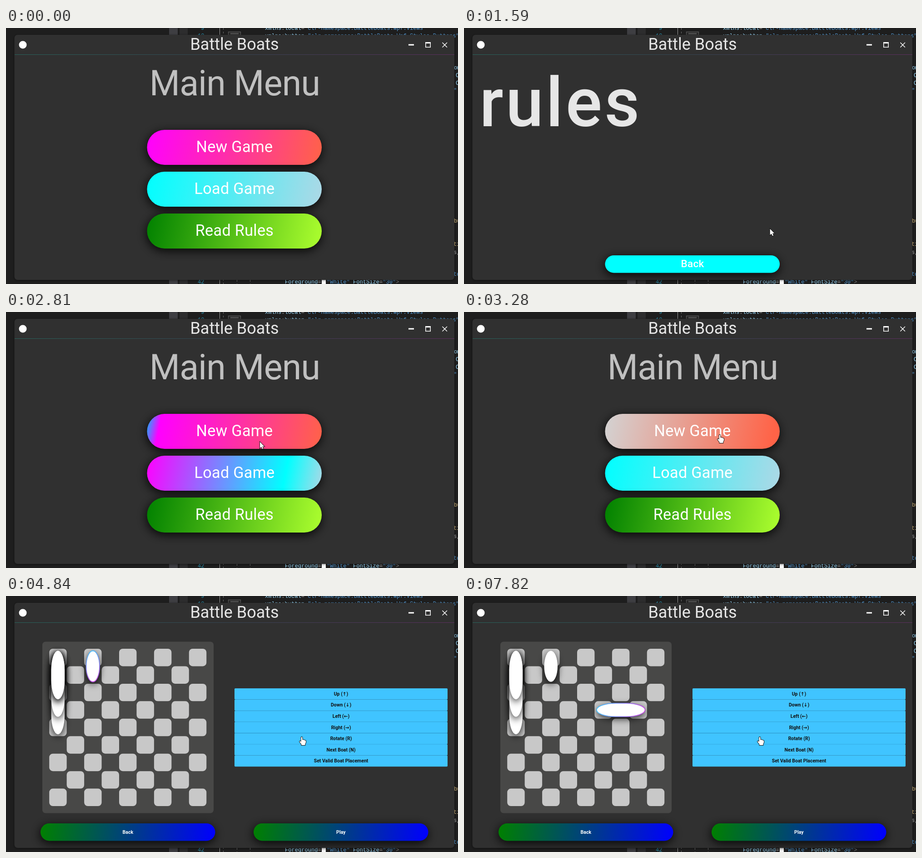
An HTML page with a canvas for the animation above (8000 ms loop, 995 px wide and 563 px high).

```html
<!DOCTYPE html>
<html lang="en">
<head>
<meta charset="utf-8">
<title>Battle Boats</title>
<style>
html, body { margin: 0; width: 100%; height: 100%; overflow: hidden; background: #1e1e1e; }
canvas { display: block; }
</style>
</head>
<body>
<canvas id="stage" width="995" height="563"></canvas>
<script>
const ctx = document.getElementById('stage').getContext('2d');
const LOOP = 8000, CELL = 38.45, BOARD_X = 95.2, BOARD_Y = 116;
const RULES_AT = 1150, MENU_AT = 2500, SETUP_AT = 3380;
const UI = 'Roboto, "DejaVu Sans", sans-serif';
const MONO = '12.08px "Liberation Mono", monospace';

// Linear interpolation through [time, value, value...] keys
function track(t, keys) {
  if (t <= keys[0][0]) return keys[0].slice(1);
  for (let i = 1; i < keys.length; i++) {
    const [a, b] = [keys[i - 1], keys[i]];
    if (t < b[0]) {
      const p = (t - a[0]) / (b[0] - a[0]);
      return a.slice(1).map((v, j) => v + (b[j + 1] - v) * p);
    }
  }
  return keys[keys.length - 1].slice(1);
}
const passed = (t, times) => times.filter(s => t >= s).length;
const within = (t, a, b) => t >= a && t < b;

function rect(x, y, w, h, fill, r = 0) {
  ctx.fillStyle = fill;
  ctx.beginPath();
  ctx.roundRect(x, y, w, h, r);
  ctx.fill();
}

function line(points, color, width) {
  ctx.strokeStyle = color;
  ctx.lineWidth = width;
  ctx.beginPath();
  points.forEach(([x, y]) => ctx.lineTo(x, y));
  ctx.stroke();
}

function text(str, x, y, font, color, align = 'center', spacing = 0) {
  ctx.font = font;
  ctx.fillStyle = color;
  ctx.textAlign = align;
  ctx.letterSpacing = spacing + 'px';
  ctx.fillText(str, x, y);
}

function shadowed(color, dx, dy, blur, draw) {
  ctx.save();
  Object.assign(ctx, { shadowColor: color, shadowOffsetX: dx, shadowOffsetY: dy, shadowBlur: blur });
  draw();
  ctx.restore();
}

// Gradient running corner to corner; stops are [offset, color]
function diagonal(x, y, w, h, stops) {
  const g = ctx.createLinearGradient(x, y, x + w, y + h);
  stops.forEach(([o, c]) => g.addColorStop(o, c));
  return g;
}

function code(x, y, ...parts) {
  parts.forEach(([str, color]) => {
    text(str, x, y, MONO, color, 'left');
    x += str.length * 7.25;
  });
}

function drawEditor() {
  const attr = '#9cdcfe', val = '#569cd6', mark = '#b4b4b4', num = '#2b91af';
  rect(0, 0, 995, 563, '#1e1e1e');
  rect(359, 0, 19, 563, '#3e3e42');
  rect(382, 0, 18, 563, '#2d2d2e');
  line([[470.5, 0], [470.5, 563]], '#a0a0a0', 1);
  ctx.setLineDash([4, 4]);
  [478.5, 508.5, 537.5].forEach((x, i) => line([[x, i ? 554 : 0], [x, 563]], '#707070', 1));
  ctx.setLineDash([]);
  code(429, 4, ['9', num]);
  code(422, 21, ['10', num]);
  code(570, 4, ['xmlns', attr], [':', mark], ['local', attr], ['=', mark], ['"clr-namespace:BattleBoats.Wpf.Views"', val]);
  code(570, 21, ['xmlns', attr], [':', mark], ['button', attr], ['=', mark], ['"clr-namespace:BattleBoats.Wpf.Styles.Buttons"', val]);
  rect(489, 8, 28, 10, '#606060');
  rect(490, 9, 26, 9, '#2a2a2a');
  rect(494, 11, 18, 3, '#505050');
  code(422, 562, ['42', num]);
  code(614, 562, ['Foreground', attr], ['=', mark]);
  rect(695, 554, 9, 9, '#fff');
  code(706, 562, ['"White"', val], [' FontSize', attr], ['=', mark], ['"30"', val], ['>', '#808080']);
  code(986, 91, ['om', attr]);
  code(990, 108, ['C', attr]);
  code(990, 125, ['C', attr]);
  code(985, 141, ['"', val]);
  code(986, 428, ['bu', '#d7ba7d']);
  code(985, 479, ['ti', '#d7ba7d']);
  code(985, 497, ['s,', mark]);
  code(985, 545, ['tc', val]);
}

function drawWindow() {
  shadowed('rgba(0,0,0,.5)', 0, 1, 5, () => rect(18.5, 15, 968.5, 539, '#303030', 7));
  const g = ctx.createLinearGradient(19, 0, 987, 0);
  g.addColorStop(0, '#28645c');
  g.addColorStop(.5, '#364452');
  g.addColorStop(1, '#5e2f61');
  rect(19, 58, 968, 1, g);
  ctx.fillStyle = '#fff';
  ctx.beginPath();
  ctx.arc(37, 37, 8.5, 0, 7);
  ctx.fill();
  text('Battle Boats', 503, 47.5, '400 36px ' + UI, '#e6e6e6');
  rect(886, 35.5, 12, 3, '#fff');
  line([[923.8, 31], [923.8, 42.2], [934.2, 42.2], [934.2, 31]], '#fff', 1.5);
  rect(923, 31, 12, 3, '#fff');
  line([[960.5, 32], [971, 42.5]], '#fff', 1.5);
  line([[971, 32], [960.5, 42.5]], '#fff', 1.5);
}

function pill(x, y, h, stops) {
  shadowed('rgba(0,0,0,.9)', -1, 5, 22, () =>
    rect(x, y, 384.5, h, diagonal(x, y, 384.5, h, stops), h / 2));
}

// On hover the middle color slides from the left end to the right
function menuButton(label, y, [first, mid, last], slide, pressed) {
  const stops = pressed ? [[0, '#d3d3d3'], [.95, last], [1, last]]
                        : [[0, first], [slide, mid], [1, last]];
  pill(310.5, y, 77, stops);
  text(label, 503, y + 48.5, '400 34.2px ' + UI, '#fff', 'center', .3);
}

function drawMenu(t) {
  text('Main Menu', 503.5, 147.5, '400 77px ' + UI, '#c0c0c0', 'center', -.8);
  const [newSlide] = track(t, [[2804, 0], [2890, 1]]);
  const [loadSlide] = track(t, [[2705, 0], [2793, .96], [2890, 0]]);
  const [readSlide] = t < 2000 ? track(t, [[840, 0], [940, 1]])
                               : track(t, [[2590, 0], [2690, 1], [2785, 0]]);
  menuButton('New Game', 224, ['deepskyblue', 'magenta', 'tomato'], newSlide, t >= 3230);
  menuButton('Load Game', 316, ['magenta', 'cyan', 'lightblue'], loadSlide);
  menuButton('Read Rules', 408, ['blue', 'green', 'greenyellow'], readSlide, within(t, 1060, RULES_AT));
}

function drawRules(t) {
  text('rules', 34, 216, '500 150px ' + UI, '#e6e6e6', 'left', 5);
  const [slide] = track(t, [[1640, 0], [1750, .9], [1880, 0], [2170, 0], [2290, .95]]);
  pill(310.5, 500, 38.5, [[0, '#b0c0bf'], [slide, 'cyan'], [1, 'cyan']]);
  text('Back', 503, 526, '500 22.5px ' + UI, '#fff', 'center', .3);
}

function boat(len, col, row, flat, selected) {
  const long = len * CELL - 8.6, short = 29.5;
  const [w, h] = flat ? [long, short] : [short, long];
  const x = BOARD_X + col * CELL + 4.4, y = BOARD_Y + row * CELL + 4.5;
  const end = Math.min(long / 2, 42);
  const radius = flat ? { x: end, y: short / 2 } : { x: short / 2, y: end };
  shadowed('rgba(0,0,0,.8)', 0, 5, 16, () => rect(x, y, w, h, '#fff', radius));
  if (!selected) return;
  ctx.strokeStyle = diagonal(x, y, w, h, [[0, '#40c4ff'], [1, '#c840e0']]);
  ctx.lineWidth = 1.8;
  ctx.stroke();
}

function drawSetup(t, pointerY) {
  rect(80, 100.5, 377, 377, '#484847', 7);
  for (let i = 0; i < 81; i += 2)
    rect(BOARD_X + i % 9 * CELL, BOARD_Y + Math.floor(i / 9) * CELL, CELL, CELL, '#c8c8c8', 8);

  const second = t >= 5580;
  [5, 4, 3].forEach(len => boat(len, 0, 0));
  boat(3, passed(t, [7210, 7350, 7530, 7680, 7820]), passed(t, [5820, 5960, 6190]), t >= 6980, second);
  boat(2, passed(t, [4600, 4840]), 0, false, !second);

  ['Up (↑)', 'Down (↓)', 'Left (←)', 'Right (→)', 'Rotate (R)', 'Next Boat (N)', 'Set Valid Boat Placement']
    .forEach((label, i) => {
      const y = 203 + i * 24.6;
      const hover = t < 4650 && pointerY >= y && pointerY < y + 24.6;
      rect(503, y, 469, 24.6, '#35aee5', 2);
      rect(503, y + .5, 469, 23.7, hover ? '#5fcdff' : '#40c4ff', 2);
      text(label, 737.5, y + 15.7, '600 10.5px ' + UI, '#111');
    });
  rect(503, 301, 469, 1, '#2b93c4');

  [['Back', 76], ['Play', 545]].forEach(([label, x]) => {
    pill(x, 500, 38.5, [[0, 'green'], [1, 'blue']]);
    text(label, x + 192.3, 522.5, '600 10.5px ' + UI, '#fff');
  });
}

const ARROW = new Path2D('M0 0V13.5L3.1 10.6 5.3 15.4 7.5 14.4 5.4 9.8H9.6Z');
const HAND = new Path2D('M-1.4 1Q0-1 1.4 1V6L3.6 5.8 4.4 6.8 6.4 6.6 7.2 7.8 9 8.2V12.5L7.4 15.5V18H-.6V16L-4.6 11Q-5.2 9-3.4 9L-1.4 10.6Z');

function drawPointer(t, [x, y]) {
  const clicking = within(t, 930, 1060) || within(t, 2340, 2440) || within(t, 3130, 3230);
  if (clicking) {
    ctx.fillStyle = 'rgba(245,220,0,.55)';
    ctx.beginPath();
    ctx.arc(x, y, 9.5, 0, 7);
    ctx.fill();
  }
  const shape = t < 2910 ? ARROW : HAND;
  ctx.save();
  ctx.translate(x, y);
  ctx.strokeStyle = '#111';
  ctx.lineWidth = 1.8;
  ctx.stroke(shape);
  ctx.fillStyle = '#fff';
  ctx.fill(shape);
  ctx.restore();
}

const POINTER = [
  [450, 915, 555], [600, 800, 505], [780, 645, 452], [900, 586, 432], [1250, 586, 432],
  [1350, 605, 385], [1450, 650, 360], [1700, 692, 505], [1920, 703, 546], [2060, 703, 546],
  [2180, 590, 536], [2290, 520, 530], [2490, 520, 530], [2570, 530, 495], [2700, 546, 400],
  [2810, 559, 286], [2910, 562, 272], [3280, 563, 270], [3650, 563, 270],
  [3850, 598, 300], [4060, 632, 338], [4270, 651, 310]
];

function frame() {
  const t = performance.now() % LOOP;
  const pointer = track(t, POINTER);
  drawEditor();
  drawWindow();
  if (t >= SETUP_AT) drawSetup(t, pointer[1]);
  else if (within(t, RULES_AT, MENU_AT)) drawRules(t);
  else drawMenu(t);
  if (t >= 450) drawPointer(t, pointer);
  requestAnimationFrame(frame);
}
frame();
</script>
</body>
</html>
```
